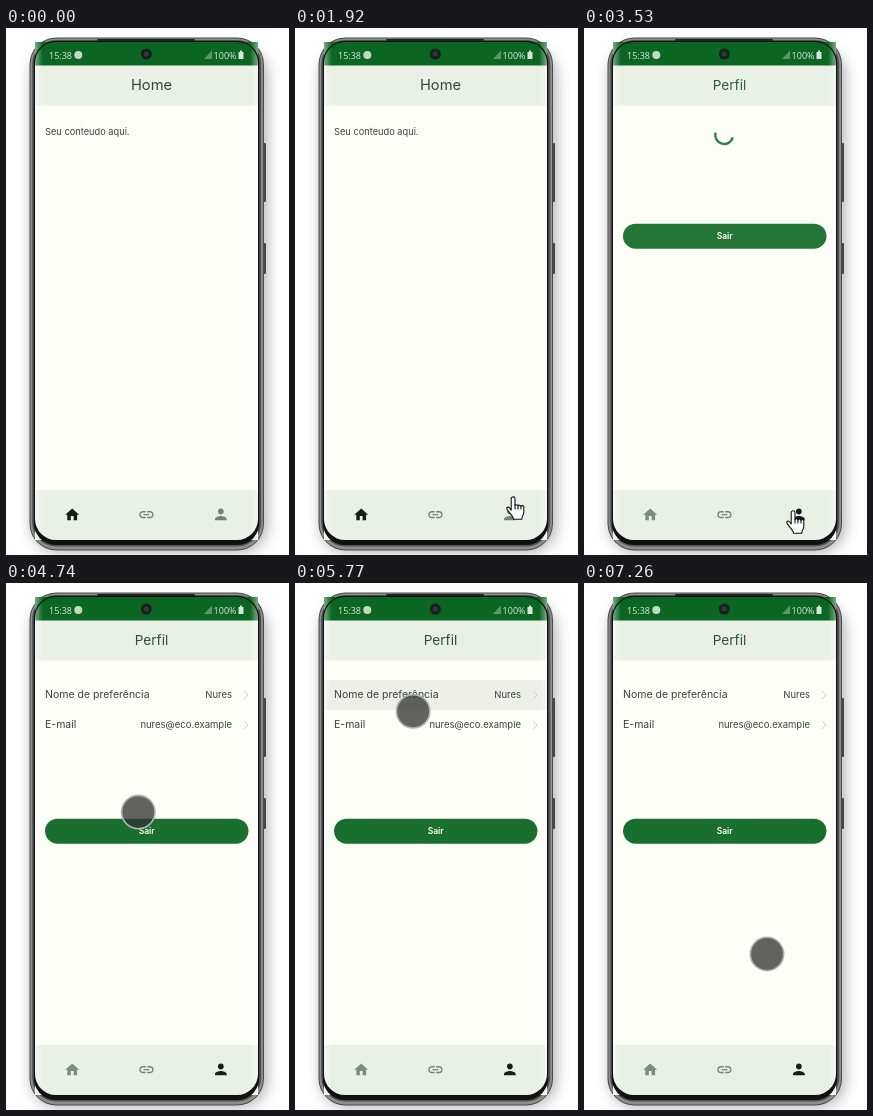
An HTML page that plays this animation: 283 by 527 pixels, repeating every 8130 ms.

```html
<!DOCTYPE html>
<html lang="pt">
<head>
<meta charset="utf-8">
<title>Perfil</title>
<style>
  html, body { margin: 0; width: 100%; height: 100%; overflow: hidden; background: #fff; }
  svg { display: block; width: 283px; height: 527px; }
  text { font-family: Inter, "Open Sans", sans-serif; fill: #3a443d; }
  .status text { font: 9px "Open Sans", "Noto Sans", sans-serif; fill: #dceade; }
  .title { font-size: 14.7px; text-anchor: middle; }
  .label { font-size: 10.5px; }
  .value { font-size: 9.5px; text-anchor: end; }
  .button { font-size: 8.5px; font-weight: 600; text-anchor: middle; fill: #fff; }
</style>
</head>
<body>
<svg viewBox="0 0 283 527" xmlns="http://www.w3.org/2000/svg">
  <defs>
    <linearGradient id="glass">
      <stop offset="0" stop-color="#fff" stop-opacity=".45"/>
      <stop offset=".035" stop-color="#fff" stop-opacity="0"/>
      <stop offset=".965" stop-color="#fff" stop-opacity="0"/>
      <stop offset="1" stop-color="#fff" stop-opacity=".45"/>
    </linearGradient>
    <filter id="blur" x="-20%" y="-20%" width="140%" height="140%"><feGaussianBlur stdDeviation="7"/></filter>
  </defs>

  <rect width="283" height="527" fill="#fff"/>
  <rect x="25" y="20" width="237" height="505" rx="28" opacity=".28" filter="url(#blur)"/>

  <!-- phone body -->
  <g fill="#484848">
    <rect x="256" y="115" width="4" height="59" rx="1"/>
    <rect x="256" y="215" width="4" height="31" rx="1"/>
  </g>
  <rect x="23.500" y="9.500" width="234.500" height="513" rx="27" fill="#4a4a4a"/>
  <rect x="24.500" y="10.500" width="232.500" height="511" rx="26" fill="#8e8e8e"/>
  <rect x="26.200" y="12" width="229" height="506.500" rx="24" fill="#505050"/>
  <rect x="91" y="11" width="98" height="2" rx="1" fill="#222"/>

  <!-- screen -->
  <rect x="29" y="37" width="223" height="425" fill="#fdfef8"/>
  <rect x="29" y="37" width="223" height="40.500" fill="#e9f1e7"/>

  <g id="home">
    <text class="title" x="145.500" y="61.900">Home</text>
    <text x="39" y="107" font-size="9.25">Seu conteudo aqui.</text>
  </g>

  <g id="profile">
    <text class="title" x="145.500" y="61.800" style="font-size:13.6px;fill:#24543a">Perfil</text>
    <path id="spinner" d="M149.200 107A9 9 0 1 1 131.200 107" fill="none" stroke="#2d7643" stroke-width="2.4"/>
    <g id="rows">
      <rect id="row1" x="29" y="97" width="223" height="30"/>
      <rect id="row2" x="29" y="127" width="223" height="30"/>
      <text class="label" x="39" y="115">Nome de preferência</text>
      <text class="value" x="226" y="115">Nures</text>
      <text class="label" x="39" y="145">E-mail</text>
      <text class="value" x="226" y="145">nures@eco.example</text>
      <path d="M238 108l4 4-4 4M238 138l4 4-4 4" fill="none" stroke="#ced2ca"/>
    </g>
    <g id="exit">
      <rect x="39" width="203.500" height="25" rx="12.500" fill="#196f2d"/>
      <text class="button" x="140.700" y="15.400">Sair</text>
    </g>
  </g>

  <rect x="29" y="462" width="223" height="50" fill="#e9f1e7"/>
  <path id="iconHome" transform="translate(57.800 478.300)scale(.7)" d="M10 20v-6h4v6h5v-8h3L12 3 2 12h3v8z"/>
  <path transform="translate(131.800 478)scale(.72)" fill="#7a817b" d="M3.900 12c0-1.710 1.390-3.100 3.100-3.100h4V7H7c-2.760 0-5 2.240-5 5s2.240 5 5 5h4v-1.900H7c-1.710 0-3.100-1.390-3.100-3.100zM8 13h8v-2H8v2zm9-6h-4v1.900h4c1.710 0 3.100 1.390 3.100 3.100s-1.390 3.100-3.100 3.100h-4V17h4c2.760 0 5-2.240 5-5s-2.240-5-5-5z"/>
  <path id="iconUser" transform="translate(206.100 477.700)scale(.73)" d="M12 12c2.210 0 4-1.790 4-4s-1.790-4-4-4-4 1.790-4 4 1.790 4 4 4zm0 2c-2.670 0-8 1.340-8 4v2h16v-2c0-2.660-5.330-4-8-4z"/>

  <g class="status">
    <rect x="29" y="14" width="223" height="23.500" fill="#0b6623"/>
    <text x="43" y="30.500">15:38</text>
    <circle cx="72.300" cy="27" r="4" fill="#c3d9c7"/>
    <path d="M198 31L206 22.500V31Z" fill="#5c9669"/>
    <text x="207.600" y="30.500">100%</text>
    <path d="M232.500 24h1.500v-1.500h2V24h1.500v7h-5z" fill="#d5e5d8"/>
  </g>
  <rect x="29" y="14" width="223" height="498" fill="url(#glass)"/>
  <circle cx="140.300" cy="26" r="5.500" fill="#17201b"/>
  <circle cx="140.300" cy="26" r="2.500" fill="#303a3b"/>

  <!-- black bezel with a rounded window -->
  <path fill="#111" fill-rule="evenodd" d="M27.800 36A22 22 0 0 1 49 13H232A22 22 0 0 1 253.200 36V494A22 22 0 0 1 232 517H49A22 22 0 0 1 27.800 494ZM29 35A21 21 0 0 1 50 14H231A21 21 0 0 1 252 35V491A21 21 0 0 1 231 512H50A21 21 0 0 1 29 491Z"/>

  <g id="hand" stroke="#111" stroke-width="1.1" stroke-linejoin="round" stroke-linecap="round">
    <path fill="#fff" d="M5.200 14V2.700a1.900 1.900 0 0 1 3.800 0V9.500a1.600 1.600 0 0 1 3 .4 1.600 1.600 0 0 1 3 .6 1.500 1.500 0 0 1 2.800 1.200V16c0 3-2 4-2 7.200H7.600C7.400 20 3 17 1 13.200 0 11.200 2.300 10.200 3.600 12z"/>
    <path fill="none" d="M9 9.500v3.500M12 10v3M15 10.600v2.400"/>
  </g>
  <circle id="touch" r="16.700" fill="#333" fill-opacity=".76" stroke="#b2b2b2" stroke-width="1.6"/>
</svg>

<script>
const LOOP = 8130;
const ENTER = 1190, OPEN = 3010, LOADED = 3860, TOUCH = 4600;
const el = id => document.getElementById(id);
const [home, profile, spinner, rows, row1, row2, exit, iconHome, iconUser, hand, touch] =
  ["home", "profile", "spinner", "rows", "row1", "row2", "exit", "iconHome", "iconUser", "hand", "touch"].map(el);

const ramp = (t, from, to) => Math.min(1, Math.max(0, (t - from) / (to - from)));
const lerp = (a, b, p) => a.map((v, i) => v + (b[i] - v) * p);
const smooth = p => p * p * (3 - 2 * p);
const easeOut = (p, power = 2) => 1 - (1 - p) ** power;

// Quadratic curve from a to b, bent towards c
const arc = (a, c, b, p) => lerp(lerp(a, c, p), lerp(c, b, p), p);
const mix = (a, b, p) => `rgb(${lerp(a, b, p).map(Math.round)})`;

// Comes in from the right, then sways around the profile tab until it rests
function handAt(t) {
  if (t < 1920) return arc([277, 423], [197, 440], [211, 468], ramp(t, ENTER, 1920));
  const sway = ramp(t, 2040, 2620);
  const x = 202 + 9 * (1 - sway) * Math.cos(sway * Math.PI * 2.2);
  return [x, 468 + 14 * easeOut(ramp(t, 1920, 2300))];
}

// Quick swipe up, slow drag across the rows, then down and aside
function touchAt(t) {
  const top = [112, 117], email = [125, 141], low = [193, 343];
  if (t < 5250) return lerp([166, 415], top, easeOut(ramp(t, TOUCH, 5250), 4));
  if (t < 6390) return lerp(top, email, ramp(t, 5250, 6350));
  if (t < 7030) return arc(email, [125, 242], low, smooth(ramp(t, 6390, 6940)));
  return lerp(low, [183, 371], ramp(t, 7030, 7260));
}

const press = (t, down, up, rise, fall, depth) =>
  depth * ramp(t, down, down + rise) * (1 - ramp(t, up, up + fall));

const show = (node, on) => node.setAttribute("display", on ? "inline" : "none");
const fade = (node, value) => node.setAttribute("opacity", value);
const place = (node, [x, y]) => node.setAttribute("transform", `translate(${x} ${y})`);

function draw(t) {
  const tab = ramp(t, OPEN, OPEN + 200);
  iconHome.setAttribute("fill", mix([22, 29, 24], [119, 141, 129], tab));
  iconUser.setAttribute("fill", mix([122, 129, 123], [22, 29, 30], tab));
  fade(home, 1 - ramp(t, OPEN + 60, OPEN + 300));
  fade(profile, ramp(t, OPEN + 140, OPEN + 540));

  const ready = t >= LOADED;
  show(spinner, !ready);
  show(rows, ready);
  fade(rows, t < LOADED + 60 ? .6 : 1);
  fade(row1, press(t, 5440, 5800, 160, 140, .06));
  fade(row2, press(t, 5960, 6490, 390, 110, .11));
  place(exit, [0, ready ? 235.7 : 195.7]);
  spinner.setAttribute("transform", `rotate(${(t - OPEN) * .36 - 172} 140.2 107)`);

  show(hand, t >= ENTER && t < TOUCH);
  place(hand, handAt(t));
  show(touch, t >= TOUCH);
  place(touch, touchAt(t));
}

const start = performance.now();
function tick() {
  draw((performance.now() - start) % LOOP);
  requestAnimationFrame(tick);
}
tick();
</script>
</body>
</html>
```
